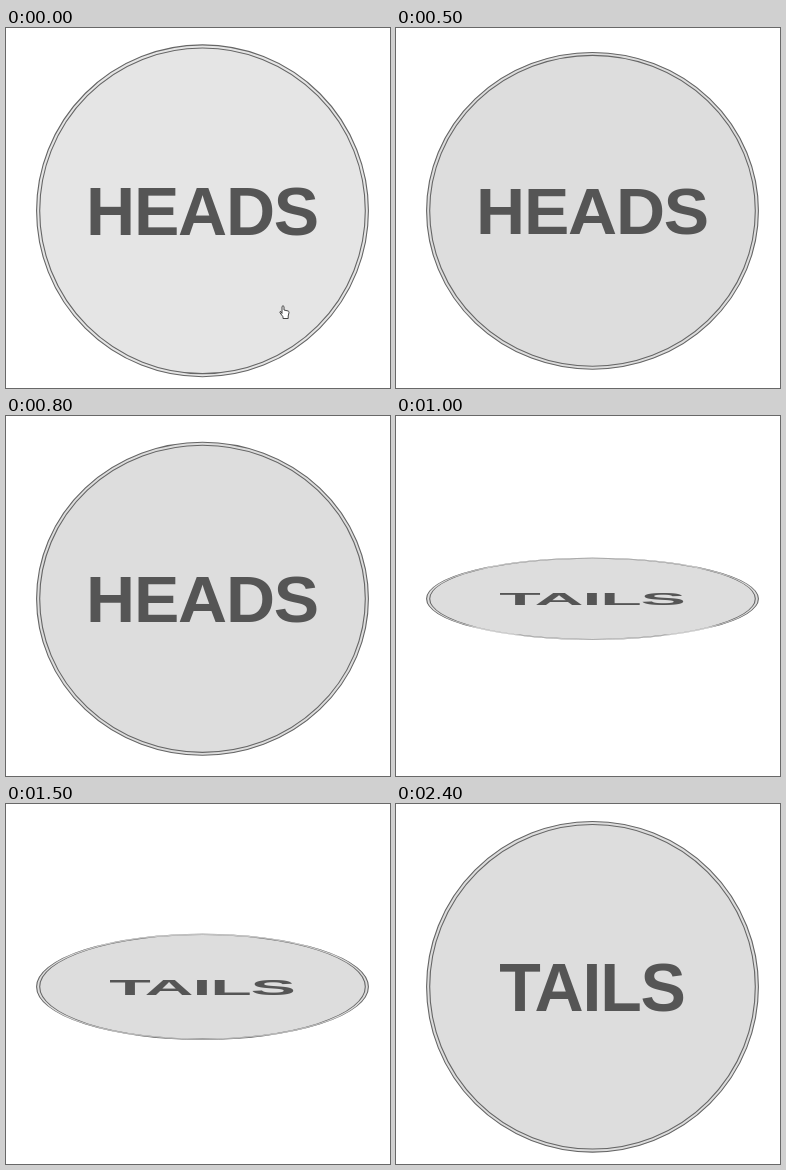
An HTML page for the animation above (2.5 s loop, 384 by 360 pixels).

```html
<!DOCTYPE html>
<html lang="en">
<head>
<meta charset="utf-8">
<title>Coin flip</title>
<style>
  html, body { margin: 0; width: 100%; height: 100%; overflow: hidden; background: #fff; }
  svg { display: block; }
  text {
    font: bold 68px "Liberation Sans", Arial, sans-serif;
    letter-spacing: -1.2px; text-anchor: middle; fill: #555;
  }
  .ring { fill: none; stroke: #666; stroke-width: 1.1; }
</style>
</head>
<body>
<svg width="384" height="360" viewBox="0 0 384 360">
  <g id="coin">
    <circle id="disc" r="166"/>
    <circle class="ring" r="165.9"/>
    <circle class="ring" r="162.8"/>
    <text id="label" x="-0.5" y="24.4"></text>
  </g>
  <path id="hand" fill="#fff" stroke="#444" stroke-linejoin="round"
    d="M276 285.5V278.5q1-1.6 2 0V282l4.2 1q1 .4 .8 1.6l-.8 3.4v2.5h-5.2v-1.7l-3-4q-.4-1.6 1-1.2z"/>
</svg>
<script>
const LOOP = 2500, STEP = 100, LAND = 1700, REST_END = 2100;
const FINAL = 9 * 180; // nine half turns, in degrees
const [coin, disc, label, hand] =
  ["coin", "disc", "label", "hand"].map(id => document.getElementById(id));

// A slowly braking spin that settles on its last half turn, then tilts slightly.
function angleAt(t) {
  const s = t - 800;
  const spin = 739.4 + 1.1917 * s - 5.1e-5 * s * s;
  const settle = FINAL - 0.2 * Math.max(0, LAND - t);
  const tilt = 0.016 * Math.max(0, t - REST_END);
  return Math.max(0, Math.min(spin, settle)) + tilt;
}

function draw(now) {
  const t = Math.floor((now % LOOP) / STEP) * STEP;
  const c = Math.cos(angleAt(t) * Math.PI / 180);
  const hover = t < STEP;
  coin.setAttribute("transform", `translate(196.5 182.8) scale(1 ${Math.abs(c)})`);
  label.textContent = c > 0 ? "HEADS" : "TAILS";
  disc.setAttribute("fill", hover ? "#e5e5e5" : "#ddd");
  hand.style.display = hover ? "" : "none";
}

const start = performance.now();
function tick() {
  draw(performance.now() - start);
  requestAnimationFrame(tick);
}
tick();
</script>
</body>
</html>
```
